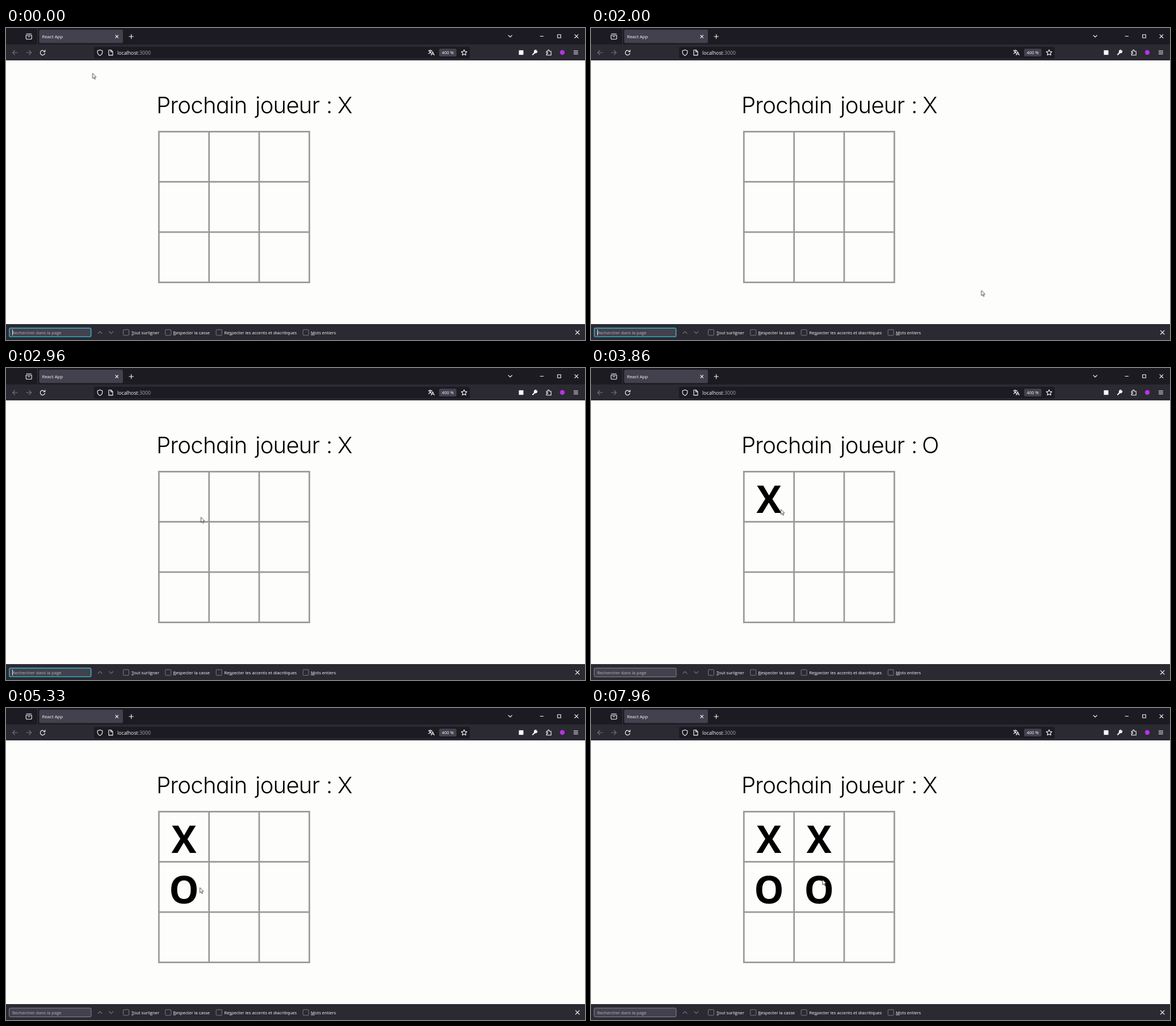
Animation of 1020 by 549 pixels, one loop 8000 ms. Source, as an HTML page:

```html
<!DOCTYPE html>
<html lang="fr">
<head>
<meta charset="utf-8">
<title>React App</title>
<style>
html, body { margin: 0; width: 100%; height: 100%; overflow: hidden; background: #fdfdfc; }
svg { display: block; width: 1020px; height: 549px; }
text { font-family: "Open Sans", "Noto Sans", sans-serif; fill: #fbfbfe; }
.ui { font-size: 7.6px; }
.key { text-decoration: underline; }
.icon { fill: none; stroke: #fbfbfe; stroke-width: 1.1; stroke-linecap: round; stroke-linejoin: round; }
.dim { stroke: #75757d; }
.title text {
  font: 300 40px Inter, Lato, sans-serif;
  font-feature-settings: "cv11";
  letter-spacing: -.75px;
  fill: #000;
}
.mark { font-size: 66px; font-weight: 700; text-anchor: middle; fill: #000; }

.step { animation: 8s step-end infinite; }
.x1 { animation-name: x1; }
.o1 { animation-name: o1; }
.x2 { animation-name: x2; }
.o2 { animation-name: o2; }
.next-x { animation-name: nextX; }
.next-o { animation-name: nextO; }
.focus { animation-name: focus; }
@keyframes x1 { 0% { visibility: hidden } 44.1%, 100% { visibility: visible } }
@keyframes o1 { 0% { visibility: hidden } 60%, 100% { visibility: visible } }
@keyframes x2 { 0% { visibility: hidden } 78.2%, 100% { visibility: visible } }
@keyframes o2 { 0% { visibility: hidden } 94.5%, 100% { visibility: visible } }
@keyframes nextX {
  0%, 60%, 94.5%, 100% { visibility: visible }
  44.1%, 78.2% { visibility: hidden }
}
@keyframes nextO {
  0%, 60%, 94.5%, 100% { visibility: hidden }
  44.1%, 78.2% { visibility: visible }
}
@keyframes focus { 0% { visibility: visible } 42%, 100% { visibility: hidden } }

.pointer { animation: move 8s linear infinite; }
@keyframes move {
  0% { transform: translate(152.5px, 79.5px); animation-timing-function: ease-in-out }
  10.4% { transform: translate(866px, 408px); animation-timing-function: ease-out }
  12% { transform: translate(876px, 420px) }
  22.4% { transform: translate(876px, 420px); animation-timing-function: ease-in }
  23.6% { transform: translate(800px, 452px) }
  25% { transform: translate(688px, 462px) }
  27.5% { transform: translate(630px, 400px) }
  30% { transform: translate(598px, 318px) }
  32.5% { transform: translate(574px, 266px) }
  34.5% { transform: translate(470px, 258px) }
  37% { transform: translate(343.5px, 262.5px); animation-timing-function: ease-out }
  42%, 48.2% { transform: translate(334.5px, 248.5px); animation-timing-function: ease-in-out }
  53.8%, 66.6% { transform: translate(341.5px, 316px); animation-timing-function: ease-in-out }
  75%, 83.2% { transform: translate(398.5px, 258px); animation-timing-function: ease-in-out }
  87%, 100% { transform: translate(408px, 302px) }
}
</style>
</head>
<body>
<svg viewBox="0 0 1020 549">
  <!-- Tab bar -->
  <rect width="1020" height="29" fill="#1c1b22"/>
  <path d="M55.5 0V29" stroke="#34333d"/>
  <rect x="58.5" y="3" width="147.5" height="23.5" rx="2.5" fill="#42414d"/>
  <text x="63.5" y="18" font-size="7.9">React App</text>
  <g class="icon">
    <path d="M36 10.2h8.6M35.3 12.7h10v5.3q0 1.7-1.7 1.7h-6.6q-1.7 0-1.7-1.7zM38.5 15.2h3.6"/>
    <path d="M193 12.7l4.6 4.6m0-4.6l-4.6 4.6M217 15h7.4M220.7 11.3v7.4"/>
    <path d="M885 12.8l3.2 3.2 3.2-3.2M941.2 14.5h5.4M971.7 11.7h5.6v5.6h-5.6zM1002 11.7l5.8 5.8m0-5.8l-5.8 5.8"/>
  </g>

  <!-- Toolbar -->
  <rect y="29" width="1020" height="28" fill="#2b2a33"/>
  <rect x="155" y="33" width="662" height="20.5" rx="2.5" fill="#1c1b22"/>
  <rect x="763" y="36.5" width="30.5" height="13.5" rx="2" fill="#42414d"/>
  <text x="196" y="46.7" font-size="8.75">localhost<tspan fill="#a3a3aa">:3000</tspan></text>
  <text x="778.2" y="46" font-size="7.5" text-anchor="middle">400 %</text>
  <g class="icon">
    <path class="dim" d="M20.3 43.3h-8.5m3.7-3.8l-3.8 3.8 3.8 3.8M36 43.3h8.5m-3.7-3.8l3.8 3.8-3.8 3.8"/>
    <path d="M68 41.4a4.1 4.1 0 1 0 .5 3M68.9 38.8v3h-3"/>
    <path d="M165.5 38.4l4.3 1.5v2.6q0 4-4.3 5.9q-4.3-1.9-4.3-5.9v-2.6z"/>
    <path d="M181 38.7h4l3 3v6.2h-7zM184.7 38.9v3.1h3"/>
    <path d="M744.2 39.7h6.4M747.3 38.4v1.3M749.4 39.7q-1 3.7-5 5.6M745.3 40.3q1 2.6 3.4 4M749 47.7l2.6-6 2.8 6M750 46h3.4"/>
    <path d="M807 38.2l1.5 3.2 3.5.4-2.6 2.4.7 3.5-3.1-1.8-3.1 1.8.7-3.5-2.6-2.4 3.5-.4z"/>
    <path d="M928 46.7l4.2-4.2" stroke-width="2.1"/>
    <path d="M935.4 40.2l-1.7 1.6-1.1-1.1 1.6-1.7a2.6 2.6 0 1 0 1.2 1.2z" fill="#fbfbfe"/>
    <path d="M952.2 41h2.2v-1q0-1.4 1.4-1.4t1.4 1.4v1h3v6.7h-8v-2.4h1q1.2 0 1.2-1.1t-1.2-1.1h-1z"/>
    <path d="M1000.4 40.2h7M1000.4 43h7M1000.4 45.8h7"/>
  </g>
  <rect x="903.5" y="39.2" width="8" height="8" fill="#fbfbfe"/>
  <circle cx="980" cy="43" r="4.2" fill="#b833e1"/>

  <!-- Page -->
  <g class="title">
    <text x="265" y="149.5">Prochain</text>
    <text x="439" y="149.5">joueur</text>
    <text x="564" y="149.5">:</text>
    <text class="step next-x" x="584" y="149.5">X</text>
    <text class="step next-o" x="583" y="149.5">O</text>
  </g>
  <path d="M269.3 182.3H534.4V447.6H269.3zM357.7 182.3V447.6M446 182.3V447.6M269.3 270.7H534.4M269.3 359.1H534.4"
    fill="none" stroke="#999" stroke-width="2.7"/>
  <text class="mark step x1" x="313.4" y="255">X</text>
  <text class="mark step o1" x="313.4" y="343.5">O</text>
  <text class="mark step x2" x="401.8" y="255">X</text>
  <text class="mark step o2" x="401.8" y="343.5">O</text>

  <!-- Find bar -->
  <rect y="521" width="1020" height="28" fill="#2b2a33"/>
  <rect x="5.5" y="528" width="144.5" height="15.5" rx="2" fill="#42414d" stroke="#85858f"/>
  <text class="ui" x="11" y="538.6" style="fill:#b4b4bd">Rechercher dans la page</text>
  <g class="step focus">
    <rect x="6" y="528.3" width="143.5" height="15" rx="2" fill="none" stroke="#2fa9bc" stroke-width="1.4"/>
    <path d="M11.5 530.5v10.5" stroke="#fbfbfe" stroke-width=".9"/>
  </g>
  <g class="icon">
    <path class="dim" d="M162 537.6l3.6-3.6 3.6 3.6M181.7 534l3.6 3.6 3.6-3.6"/>
    <path d="M1003.4 532.4l6.6 6.6m0-6.6l-6.6 6.6"/>
  </g>
  <g fill="#2b2a33" stroke="#85858f" stroke-width=".9">
    <rect x="206.5" y="530.8" width="10" height="10" rx="1.2"/>
    <rect x="280.7" y="530.8" width="10" height="10" rx="1.2"/>
    <rect x="370.2" y="530.8" width="10" height="10" rx="1.2"/>
    <rect x="523.2" y="530.8" width="10" height="10" rx="1.2"/>
  </g>
  <g class="ui">
    <text x="221" y="538.6"><tspan class="key">T</tspan>out surligner</text>
    <text x="294.5" y="538.6"><tspan class="key">R</tspan>especter la casse</text>
    <text x="384.5" y="538.6">Re<tspan class="key">s</tspan>pecter les accents et diacritiques</text>
    <text x="537" y="538.6"><tspan class="key">M</tspan>ots entiers</text>
  </g>

  <path class="pointer" d="M0 0V9.2L2.1 7.3 3.6 10.6 5 10 3.6 6.8 6.3 6.5z"
    fill="#fff" stroke="#222" stroke-width=".8" stroke-linejoin="round"/>
</svg>
</body>
</html>
```
